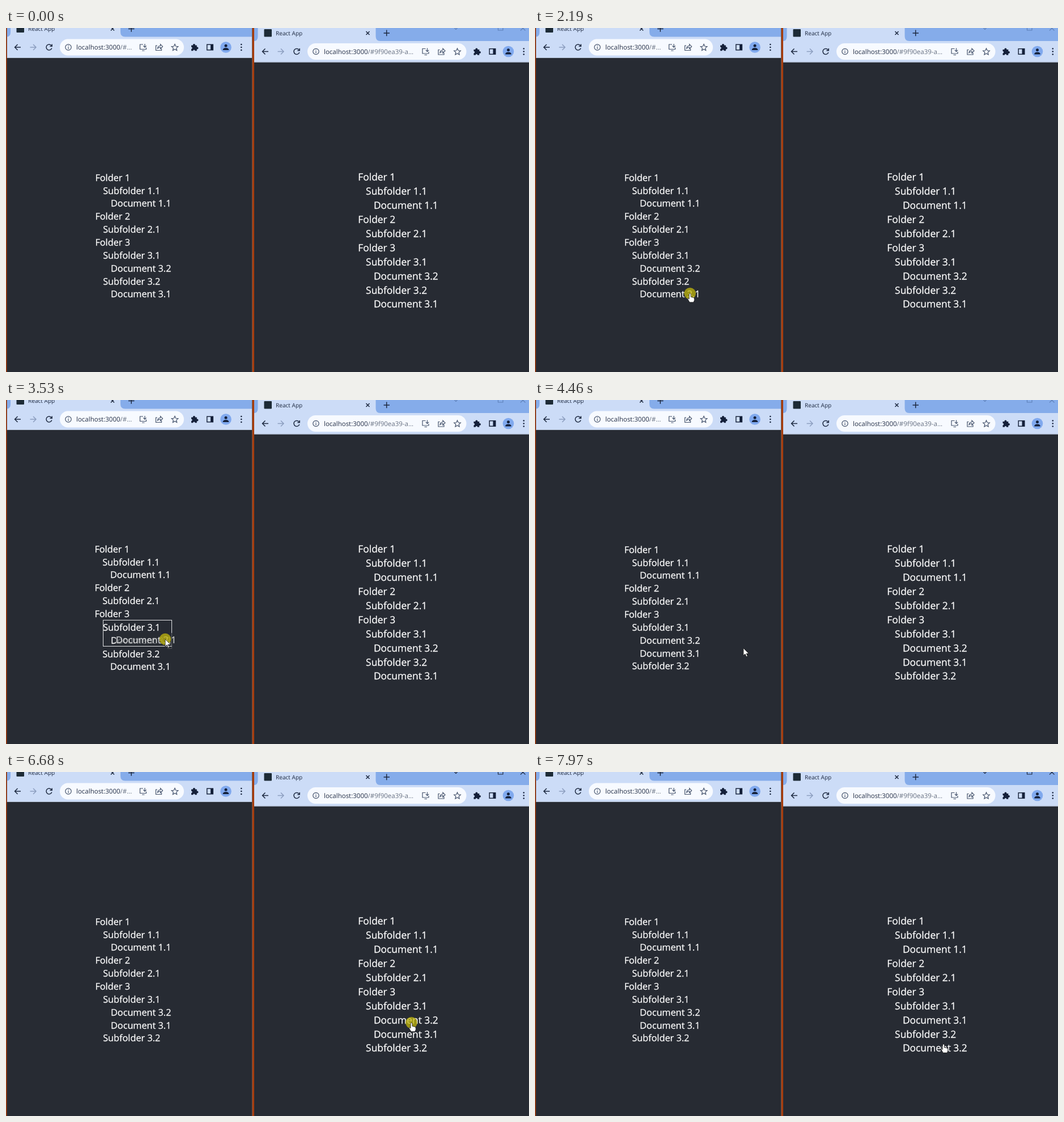
Recreate the animation shown at these times as an HTML page. Size 923 px wide and 607 px high, loop 8000 ms.

```html
<!DOCTYPE html>
<html lang="en">
<head>
<meta charset="utf-8">
<title>Folder tree</title>
<style>
  html, body { margin: 0; width: 100%; height: 100%; overflow: hidden; background: #272b33; }
  svg { display: block; width: 923px; height: 607px; }
  text { font-family: "Open Sans", "Noto Sans", sans-serif; white-space: pre; text-rendering: geometricPrecision; }
  .row { fill: #fff; stroke: #fff; stroke-width: .25; }
  .line { fill: none; stroke: #1d2940; stroke-width: 1.5; }
  .thin { stroke-width: 1.2; stroke: #44526b; }
  .dim { stroke: #8d9fc0; }
  .solid { fill: #14203a; }
</style>
</head>
<body>
<svg viewBox="0 0 923 607">
  <g id="windows"></g>
  <g id="trees"></g>
  <g id="overlay"></g>
</svg>
<script>
const LOOP = 8000, BG = '#272b33';
const $ = id => document.getElementById(id);

// Browser windows: the two share one toolbar, shifted in groups.
function browser({ left, width, y, nav, tab, tools, path }) {
  const at = (dx, body) => `<g transform="translate(${dx} ${y})">${body}</g>`;
  const right = left + width;
  return `
    <svg x="${left}" y="0" width="${width}" height="607" viewBox="${left} 0 ${width} 607">
    <rect x="${left}" width="${width}" height="${53 + y}" fill="#ccdcf7"/>
    <path d="M${202 + tab} -9V${y + 7}q0 8.500 8 8.500H${right}V-9z
      M${left} 0h6.500V${y + 7}q0 8.500 -6.500 8.500z" fill="#85acea"/>
    <rect x="${95 + nav}" y="${19.5 + y}" width="${219 + tools - nav}" height="29" rx="14.500" fill="#f7faff"/>
    <rect x="${left}" y="${52 + y}" width="${width}" height="1" fill="#b4c0d3"/>
    ${at(nav, `
      <rect x="18.500" y="-5.500" width="13.500" height="13.500" rx="1" fill="#1d2b36"/>
      <text x="39" y="5" font-size="10.100" fill="#1d2940">React App</text>
      <path class="line" d="M26 34H15.500m5 -5l-5 5 5 5"/>
      <path class="line dim" d="M42.500 34H53m-5 -5l5 5 -5 5"/>
      <path class="line" d="M80.200 31.200a5 5 0 1 0 .6 4.300M81.200 28.500v3.700h-3.800"/>
      <circle class="line thin" cx="110" cy="34" r="5.200"/>
      <path class="line thin" d="M110 33.300v3.600M110 30.800v1.300"/>
      <text x="124" y="38" font-size="11.500" fill="#253047">localhost:3000<tspan fill="#667080">${path}</tspan></text>`)}
    ${at(tab, `
      <path class="line" d="M185 -1.500l6 6m0 -6l-6 6M216 1.500h10.500M221.200 -4v10.800"/>`)}
    ${at(tools, `
      <path class="line thin" d="M242 29h-5.500v8.500h11v-3M240 40h4.500M245 28v6m-2.700 -2.600l2.700 2.700 2.700 -2.700"/>
      <path class="line thin" d="M267 31h-2.500v8.500h10v-3M267.500 36q.5 -4.500 5 -4.500v-2.800l4 4 -4 4v-2.700q-3 0 -5 2z"/>
      <path class="line thin" d="M298 28.500l1.700 3.800 4.100 .4 -3.100 2.700 .9 4.100 -3.600 -2.100 -3.600 2.100 .9 -4.100 -3.100 -2.700 4.100 -.4z"/>
      <path class="solid" d="M327 30.500h3a2 2 0 1 1 3.800 0h3v3a2 2 0 1 1 0 3.800v2.900h-3.200a1.700 1.700 0 0 0 -3.400 0h-3.200v-3.200a1.700 1.700 0 0 0 0 -3.400z"/>
      <rect class="line" x="354.700" y="29.200" width="10.600" height="9.600"/>
      <rect class="solid" x="361" y="29" width="4.500" height="10"/>
      <circle cx="388" cy="34" r="9.800" fill="#80a9ee"/>
      <circle class="solid" cx="388" cy="31.300" r="2.500"/>
      <path class="solid" d="M382.800 39v-1.500q1.500 -2.400 5.200 -2.400t5.200 2.400v1.500z"/>
      ${[29, 34, 39].map(cy => `<circle class="solid" cx="415.300" cy="${cy}" r="1.300"/>`).join('')}`)}
    </svg>`;
}

$('windows').innerHTML = `
  <rect width="923" height="607" fill="${BG}"/>
  ${browser({ left: 1.5, width: 433, y: 0, nav: 0, tab: 0, tools: 0, path: '/#...' })}
  ${browser({ left: 438, width: 485, y: 7.5, nav: 437, tab: 450.5, tools: 498.5, path: '/#9f90ea39-a...' })}
  <path id="controls" class="line thin" d="M791.500 0l2.500 2.500 2.500 -2.500M868.500 -4h8.500v8h-8.500zM908 -4l8.500 8.500m0 -8.500l-8.500 8.500"/>
  <rect width="1.500" height="607" fill="#a63d0e"/>
  <rect x="434" width="1" height="607" fill="#7b5545"/>
  <rect x="435" width="3" height="607" fill="#a63d0e"/>`;

// Trees
const HEAD = ['Folder 1', 'Subfolder 1.1', 'Document 1.1', 'Folder 2', 'Subfolder 2.1', 'Folder 3', 'Subfolder 3.1'];
const START = [...HEAD, 'Document 3.2', 'Subfolder 3.2', 'Document 3.1'];
const MOVED = [...HEAD, 'Document 3.2', 'Document 3.1', 'Subfolder 3.2'];
const SWAPPED = [...HEAD, 'Document 3.1', 'Subfolder 3.2', 'Document 3.2'];
const LEFT = { x: 157.4, y: 251.9, row: 22.85, size: 16.25, right: 292.5 };
const RIGHT = { x: 621.3, y: 249.9, row: 24.9, size: 17.4, right: 763.5 };
const INDENT = 13.8, BASELINE = 0.78;

const label = (p, name, x, y, extra = '') =>
  `<text class="row" x="${x}" y="${y + p.row * BASELINE}" font-size="${p.size}" ${extra}>${name}</text>`;
const rowX = (p, name) => p.x + INDENT * 'FSD'.indexOf(name[0]);
const rowY = (p, i) => p.y + i * p.row;

// The one-pixel border of the drop target [first, count] nudges the rows around it.
function tree(p, names, target) {
  const [first, count] = target || [0, names.length];
  const rows = names.map((name, i) => {
    const dx = i < first || i >= first + count ? -1 : 0;
    const dy = i < first ? -1 : i >= first + count ? 1 : 0;
    return label(p, name, rowX(p, name) + dx, rowY(p, i) + dy);
  });
  if (target) {
    const x = Math.floor(p.x + INDENT) + 0.5, y = Math.floor(rowY(p, first) - 0.6) + 0.5;
    rows.push(`<rect x="${x}" y="${y}" width="${p.right - x}" height="${Math.round(count * p.row + 0.6)}" fill="none" stroke="#e2e3e5"/>`);
  }
  return rows.join('');
}

function ghost(p, names, i, dx, dy) {
  const x = rowX(p, names[i]) + dx, y = rowY(p, i) + dy;
  return `<rect x="${x}" y="${y}" width="${p.right - rowX(p, names[i])}" height="${p.row}" fill="${BG}" opacity=".7"/>`
    + label(p, names[i], x, y, 'opacity=".8"');
}

// Pointer: time, x, y
const PATH = [
  [910, 648, 568], [980, 652, 569], [1110, 652, 569], [1380, 273.5, 468.5],
  [2370, 273.5, 468.5], [2580, 277, 441], [3200, 279, 427], [3260, 279, 427], [3530, 281, 422],
  [4390, 281, 422], [4740, 709, 500], [5000, 709, 500], [5270, 714, 453],
  [5400, 714, 453], [5660, 712, 456], [5950, 715.5, 442.5],
  [6810, 715.5, 442.5], [7150, 719, 473], [7570, 721, 480]
];

function pointerAt(t) {
  const i = PATH.findIndex(k => k[0] > t);
  if (i < 0) return PATH[PATH.length - 1].slice(1);
  const [t0, x0, y0] = PATH[i - 1], [t1, x1, y1] = PATH[i];
  const f = (t - t0) / (t1 - t0);
  return [x0 + (x1 - x0) * f, y0 + (y1 - y0) * f];
}

const ARROW = '<path d="M0 0V13l3 -2.700 2.200 5 2.200 -1 -2.200 -4.700h4.300z" fill="#fff" stroke="#111" stroke-width=".8"/>';
const HAND = '<path d="M-1.500 1q1.500 -2 3 0V6l4.500 1q1.800 .5 1.800 2.500V12l-1.500 3.500h-7l-3.500 -6q.7 -2 2.700 .2z" fill="#fff" stroke="#111" stroke-width=".8"/>';
const DRAG_MARK = '<rect x="4.500" y="9.500" width="7" height="7" fill="none" stroke="#777" stroke-dasharray="1 1"/>';

const within = (t, a, b) => t >= a && t < b;
const inTree = (p, x, y) => x > p.x && x < p.right && y > p.y && y < rowY(p, 10);
const shown = {};
function put(id, html) {
  if (shown[id] !== html) $(id).innerHTML = shown[id] = html;
}

function draw(t) {
  const leftDrag = within(t, 2440, 3600), rightDrag = within(t, 6880, 7900);
  const pressed = within(t, 2190, 3600) || within(t, 6680, 7900);
  const [x, y] = t < 910 ? [0, 0] : pointerAt(t);
  const leftNames = t < 3600 ? START : MOVED;
  const rightNames = t < 3660 ? START : t < 7900 ? MOVED : SWAPPED;

  // The right window gains focus with the second press.
  $('controls').style.stroke = t < 6680 ? '#5f82bb' : '#1d2940';

  put('trees',
    tree(LEFT, leftNames, leftDrag && (y > 434 ? [8, 2] : [6, 2])) +
    tree(RIGHT, rightNames, rightDrag && (y < 474.5 ? [6, 3] : [9, 1])));

  let over = '';
  if (leftDrag) over += ghost(LEFT, START, 9, x - 272, y - 468.5);
  if (rightDrag) over += ghost(RIGHT, MOVED, 7, x - 715, y - 442.5);
  if (pressed) over += `<circle cx="${x}" cy="${y}" r="10.300" fill="#c3b80c" opacity=".75"/>`;
  if (t >= 910) {
    const dragging = leftDrag || rightDrag;
    const hand = !dragging && (inTree(LEFT, x, y) || inTree(RIGHT, x, y));
    over += `<g transform="translate(${x} ${y})">${hand ? HAND : ARROW}${dragging ? DRAG_MARK : ''}</g>`;
  }
  put('overlay', over);
}

const start = performance.now();
function tick() {
  draw((performance.now() - start) % LOOP);
  requestAnimationFrame(tick);
}
tick();
</script>
</body>
</html>
```
